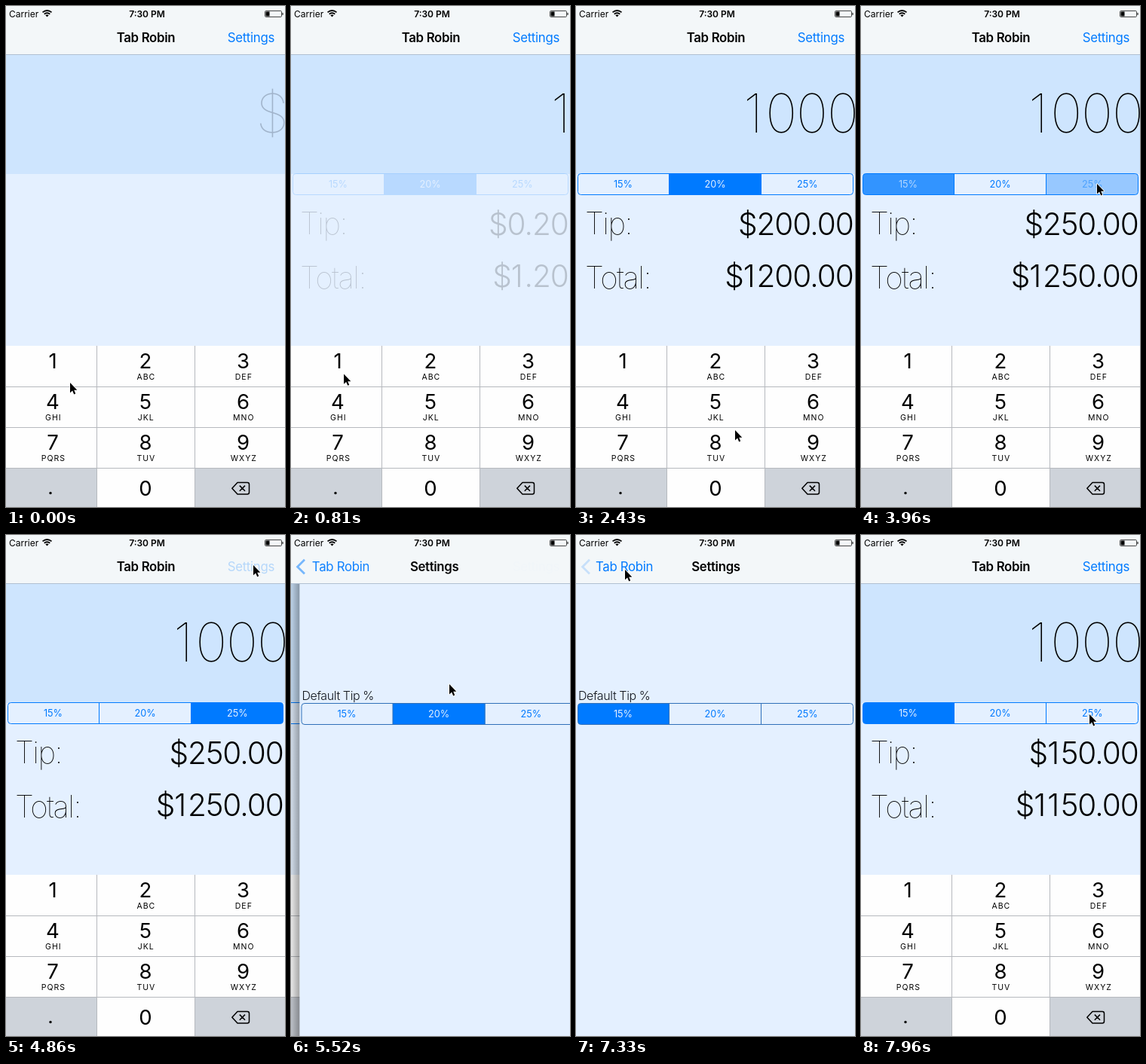
Write an HTML page that moves like this. It is 370 px wide and 665 px high and loops after 8 s.

```html
<!DOCTYPE html>
<html lang="en">
<head>
<meta charset="utf-8">
<title>Tip calculator</title>
<style>
  html, body { margin: 0; width: 100%; height: 100%; overflow: hidden; background: #e4f0ff; }
  svg { display: block; width: 370px; height: 665px; font-family: Inter, Roboto, sans-serif; }
  text { white-space: pre; }
  .mid { text-anchor: middle; }
  .end { text-anchor: end; }
  .bar { font-size: 16.8px; letter-spacing: -.3px; }
  .bold { font-weight: 600; }
  .link { fill: #007aff; }
  .small { font-size: 12px; }
  .bill { font-size: 71px; font-weight: 100; letter-spacing: -1px; }
  .label { font-size: 40.5px; font-weight: 100; letter-spacing: -1.6px; }
  .sum { font-size: 40.5px; font-weight: 300; letter-spacing: -1px; }
  .one { letter-spacing: .045em; }
  .seg text { font-size: 12.7px; }
  .digit { font-size: 27.5px; }
  .letters { font-size: 10.5px; letter-spacing: 1px; }
</style>
</head>
<body>
<svg viewBox="0 0 370 665">
  <defs>
    <linearGradient id="shade">
      <stop offset="0" stop-opacity="0"/>
      <stop offset="1" stop-opacity=".28"/>
    </linearGradient>
    <clipPath id="round"><rect x="2.5" y=".5" width="365" height="28" rx="4"/></clipPath>
  </defs>

  <g id="main">
    <rect width="370" height="665" fill="#e4f0ff"/>
    <rect y="65" width="370" height="158" fill="#cee5fe"/>
    <text id="bill" class="bill end" x="374" y="168"></text>
    <g id="result">
      <g id="rates" class="seg" transform="translate(0 222)"></g>
      <text class="label" x="12" y="303">Tip:</text>
      <text class="label" x="12" y="375">Total:</text>
      <text id="tip" class="sum end" x="367.8" y="304"></text>
      <text id="total" class="sum end" x="367.8" y="373"></text>
    </g>
    <g id="pad"></g>
    <rect id="dim" width="370" height="665"/>
  </g>

  <g id="settings">
    <rect x="-11" width="11" height="665" fill="url(#shade)"/>
    <rect width="370" height="665" fill="#e4f0ff"/>
    <text x="3" y="219" font-size="16" font-weight="300" letter-spacing="-.4" fill="#12161c">Default Tip %</text>
    <g id="defaults" class="seg" transform="translate(0 223)"></g>
  </g>

  <rect width="370" height="64" fill="#f3f7f9"/>
  <rect y="64" width="370" height="1" fill="#b1c0d2"/>
  <text class="small" x="4" y="14.5">Carrier</text>
  <g fill="none" stroke="#000" stroke-width="1.8">
    <path d="M48.5 8.4Q54.5 3.6 60.5 8.4M50.7 10.8Q54.5 7.7 58.3 10.8"/>
  </g>
  <path d="M52.3 12.2Q54.5 10.6 56.7 12.2L54.5 14.6Z"/>
  <text class="small bold mid" x="187" y="14.5">7:30 PM</text>
  <rect x="343.5" y="6.5" width="22" height="8" rx="1.2" fill="none" stroke="#333" stroke-width=".9"/>
  <path d="M344.5 7.5h5v6h-5zM366.5 9h1v3h-1z"/>

  <text id="mainTitle" class="bar bold mid" x="185.5" y="48">Tab Robin</text>
  <text id="gear" class="bar link end" x="356" y="48">Settings</text>
  <text id="setTitle" class="bar bold mid" x="185.5" y="48">Settings</text>
  <text id="back" class="bar link" x="26" y="48">Tab Robin</text>
  <path id="chevron" d="M18 32.8L8.6 42.2L18 51.6" fill="none" stroke="#007aff" stroke-width="2.8"/>

  <g id="cursor">
    <path d="M0 0V13.4L3.1 10.6L5.2 15.4L7.2 14.5L5.2 9.7H9.3Z" fill="#000" stroke="#fff" stroke-width="1.6" paint-order="stroke" stroke-linejoin="round"/>
  </g>
</svg>
<script>
const LOOP = 8000, WIDTH = 370, FADE = 180;
const RATES = [15, 20, 25];
const PUSH = 5340, POP = 7430;
const $ = id => document.getElementById(id);
const clamp = v => Math.min(1, Math.max(0, v));
const within = (t, a, b) => t >= a && t < b;
const shift = (id, x, y = 0) => $(id).setAttribute('transform', `translate(${x} ${y})`);
const alpha = (id, v) => $(id).setAttribute('opacity', v);

// [time, x, y] of the pointer tip
const PATH = [
  [0, 85, 500], [180, 85, 500], [600, 64, 480], [760, 64, 480], [1140, 187, 652],
  [2429, 187, 652], [2430, 211, 563], [2860, 62, 228], [3290, 62, 228],
  [3840, 313, 236], [4240, 313, 236], [4800, 328, 40], [5330, 328, 40],
  [5520, 210, 198], [5900, 80, 236], [6200, 62, 240], [6450, 62, 240],
  [7100, 65, 46], [7450, 65, 46], [7740, 135, 84], [7940, 303, 238], [LOOP, 303, 238]
];
// [time, value]
const BILLS = [[0, 0], [740, 1], [1220, 10], [1400, 100], [1580, 1000]];
const RATE_PICKS = [[0, 1], [2950, 0], [3900, 2], [6600, 0]];
const DEFAULT_PICKS = [[0, 1], [6250, 0]];

const lastIndex = (list, t) => list.findLastIndex(e => e[0] <= t);
const valueAt = (list, t) => list[lastIndex(list, t)][1];

function buildSegments(id, line) {
  let fills = '', labels = '';
  RATES.forEach((rate, i) => {
    fills += `<rect class="fill" x="${1.5 + i * 122}" width="122.5" height="29" fill="#007aff"/>`;
    labels += `<text class="mid" x="${62.5 + i * 122.2}" y="19">${rate}%</text>`;
  });
  $(id).innerHTML = `<g clip-path="url(#round)">${fills}</g>
    <path d="M123.5 .5v28M245.5 .5v28" stroke="${line}"/>
    <rect x="2.5" y=".5" width="365" height="28" rx="4" fill="none" stroke="${line}"/>${labels}`;
}

function buildPad() {
  const letters = ['', 'ABC', 'DEF', 'GHI', 'JKL', 'MNO', 'PQRS', 'TUV', 'WXYZ'];
  const centers = [62, 185, 314.5];
  let keys = '';
  letters.forEach((word, i) => {
    const x = centers[i % 3], y = 481 + 54 * Math.floor(i / 3);
    keys += `<text class="digit mid" x="${x}" y="${y}">${i + 1}</text>
      <text class="letters mid" x="${x + .8}" y="${y + 15}">${word}</text>`;
  });
  $('pad').innerHTML = `<rect y="451" width="370" height="214" fill="#fefefe"/>
    <path d="M0 613h120v52H0zM251 613h119v52H251z" fill="#ced3da"/>
    <rect id="key1" y="451" width="120" height="54" fill="#ced3da"/>
    <rect id="key0" x="121" y="613" width="129" height="52" fill="#ced3da"/>
    <path d="M0 505.5h370M0 559.5h370M0 613.5h370M120.5 451v214M250.5 451v214" stroke="#b6b9be"/>
    ${keys}<text class="digit mid" x="185" y="650">0</text>
    <circle cx="59" cy="646.5" r="1.7"/>
    <path d="M307 632.5H320Q322.5 632.5 322.5 635V645.5Q322.5 648 320 648H307L299.8 640.2ZM309.8 636.6l7.2 7.2m0-7.2l-7.2 7.2"
      fill="none" stroke="#000" stroke-width="1.5" stroke-linejoin="round"/>`;
}

function drawSegments(id, picks, t) {
  const n = lastIndex(picks, t), p = clamp((t - picks[n][0]) / FADE);
  const fills = $(id).querySelectorAll('.fill'), labels = $(id).querySelectorAll('text');
  RATES.forEach((_, i) => {
    let a = 0;
    if (i === picks[n][1]) a = n ? p : 1;
    else if (n && i === picks[n - 1][1]) a = 1 - p ** 1.4;
    fills[i].setAttribute('opacity', a);
    labels[i].setAttribute('fill', `rgb(${228 * a},${122 + 118 * a},255)`);
  });
}

// Critically damped slide, 0 to 1
function spring(ms) {
  if (ms <= 0) return 0;
  if (ms > 400) return 1;
  const k = 23 * ms / 1000;
  return 1 - (1 + k) * Math.exp(-k);
}

function drawCursor(t) {
  const i = Math.min(lastIndex(PATH, t), PATH.length - 2);
  const [t0, x0, y0] = PATH[i], [t1, x1, y1] = PATH[i + 1];
  const u = clamp((t - t0) / (t1 - t0)), e = u * u * (3 - 2 * u);
  shift('cursor', x0 + (x1 - x0) * e, y0 + (y1 - y0) * e);
}

// The narrow 1 gets looser tracking
function setNumber(id, text) {
  $(id).innerHTML = text.replace(/1/g, '<tspan class="one">1</tspan>');
}

function drawBill(t) {
  const bill = valueAt(BILLS, t), tip = bill * RATES[valueAt(RATE_PICKS, t)] / 100;
  setNumber('bill', bill ? String(bill) : '$');
  $('bill').setAttribute('fill', bill ? '#000' : '#a1b4cb');
  setNumber('tip', '$' + tip.toFixed(2));
  setNumber('total', '$' + (bill + tip).toFixed(2));
  alpha('result', clamp((t - 740) / 380));
  alpha('key1', +within(t, 640, 740));
  alpha('key0', +[1170, 1350, 1530].some(s => within(t, s, s + 70)));
}

function drawPages(t) {
  const p = t < PUSH ? 0 : t < POP ? spring(t - PUSH + 50) : 1 - spring(t - POP), q = 1 - p;
  shift('main', -111 * p);
  alpha('dim', .1 * p);
  shift('settings', WIDTH * q);
  alpha('settings', +(p > 0));
  shift('mainTitle', -118 * p);
  alpha('mainTitle', q * q);
  alpha('gear', q * (within(t, 4860, POP) ? .25 : 1));
  shift('setTitle', 150 * q);
  alpha('setTitle', p);
  shift('back', 60 * q);
  alpha('back', p * p);
  const pressed = within(t, 7250, POP);
  alpha('chevron', t < PUSH ? 0 : pressed ? .18 : t < POP ? clamp((t - PUSH + 50) / 450) : .18 * p);
}

function draw(t) {
  drawBill(t);
  drawSegments('rates', RATE_PICKS, t);
  drawSegments('defaults', DEFAULT_PICKS, t);
  drawPages(t);
  drawCursor(t);
}

buildSegments('rates', '#007aff');
buildSegments('defaults', '#2f70b9');
buildPad();
const start = performance.now();
function tick() {
  draw((performance.now() - start) % LOOP);
  requestAnimationFrame(tick);
}
tick();
</script>
</body>
</html>
```
